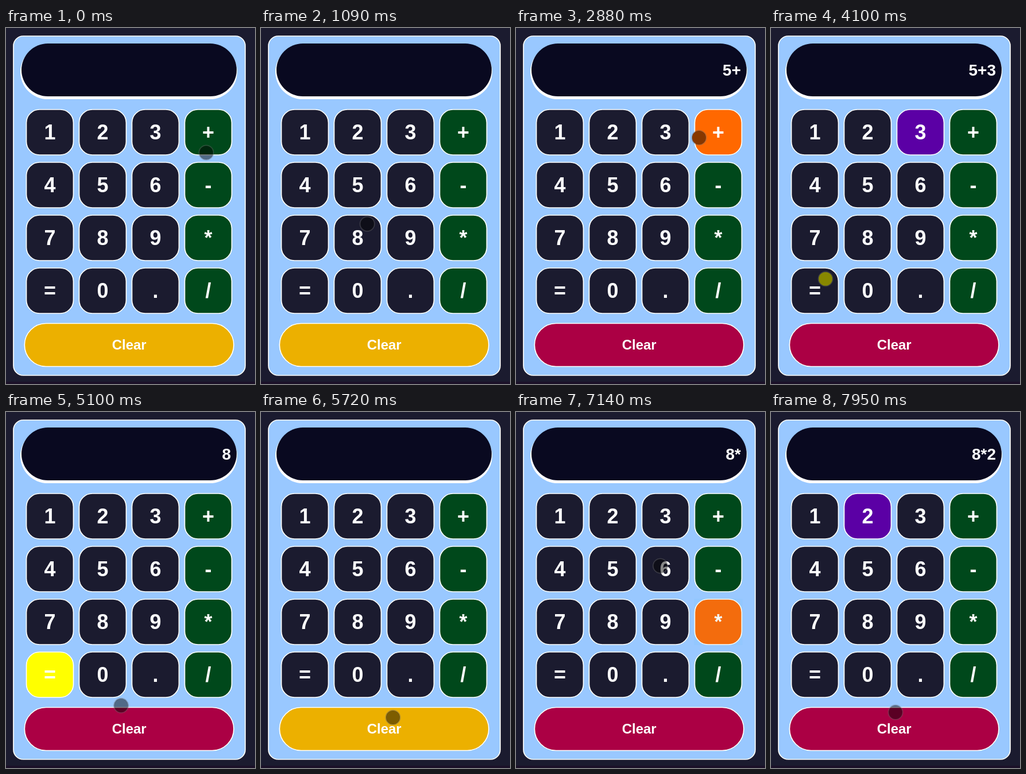
Recreate the animation shown at these times as an HTML page. Size 434 by 620 pixels, loop 8000 ms.

```html
<!DOCTYPE html>
<html lang="en">
<head>
<meta charset="utf-8">
<title>Calculator</title>
<style>
  html, body { margin: 0; width: 100%; height: 100%; overflow: hidden; background: #1b1b2f; }
  svg { display: block; width: 434px; height: 620px; }
  text { font-family: "Liberation Sans", Arial, sans-serif; font-weight: bold; fill: #fff; }
</style>
</head>
<body>
<svg id="stage" viewBox="0 0 434 620"></svg>
<script>
const LOOP = 8000;
const stage = document.getElementById('stage');

function add(tag, attrs, text) {
  const el = document.createElementNS('http://www.w3.org/2000/svg', tag);
  set(el, attrs);
  if (text) el.textContent = text;
  stage.append(el);
  return el;
}
function set(el, attrs) {
  for (const k in attrs) el.setAttribute(k, attrs[k]);
}
const box = (x, y, width, height, rx, fill, more) =>
  add('rect', { x, y, width, height, rx, fill, ...more });
const border = { stroke: '#fff', 'stroke-width': 1.7 };

// Case and display
box(0, 0, 434, 620, 0, '#1b1b2f');
box(0, 616, 434, 4, 0, '#1b1128');
box(13, 14, 404, 591, 17, '#99c8ff', border);
box(25, 29, 378, 95, 47.5, '#fff');
box(27, 27, 375, 92, 46, '#090920');
const display = add('text', { x: 392, y: 83, 'font-size': 28, 'text-anchor': 'end' });

// Keys
const keys = {};
function addKey(label, x, y, w, h, rx, size, base, hover) {
  const face = box(x + 1, y + 1, w - 2, h - 2, rx, base, border);
  add('text', {
    x: x + w / 2, y: Math.floor(y + h / 2 + size * 0.352),
    'font-size': size, 'text-anchor': 'middle'
  }, label);
  keys[label] = { face, base, hover, area: { x, y, width: w, height: h } };
}
[...'123+456-789*=0./'].forEach((label, i) => {
  const col = i % 4, row = Math.floor(i / 4);
  const hover = col === 3 ? '#ff6800' : label === '=' ? '#ffff00' : '#5b00a5';
  addKey(label, 34.5 + 92 * col, 141 + 92 * row, 84, 81, 23, 36,
    col === 3 ? '#00481b' : '#1b1b2f', hover);
});
addKey('Clear', 31.3, 513.5, 366.7, 77, 37.5, 24, '#ab0044', '#ecb000');

const flash = box(0, 0, 0, 0, 0, '#33b5e5');

// Touch pointer: key tint, soft ring, dark dot
const tint = add('circle', { r: 12 });
const ring = add('circle', { r: 12.5, fill: 'none', stroke: '#666', 'stroke-width': 2, 'stroke-opacity': 0.4 });
const dot = add('circle', { r: 12, 'fill-opacity': 0.47 });

const taps = [
  { at: -1000, key: 'Clear' }, { at: 2080, key: '5' }, { at: 2700, key: '+' },
  { at: 3120, key: '3' }, { at: 4130, key: '=' }, { at: 5590, key: 'Clear' },
  { at: 6380, key: '8' }, { at: 7015, key: '*' }, { at: 7560, key: '2' }
];

const sum = text => String(text.split('+').reduce((a, b) => a + Number(b), 0));
const press = (text, key) =>
  key === 'Clear' ? '' : key === '=' ? sum(text) : text + key;

// Pointer moves; bend pushes the curve to one side
const start = { x: 349, y: 217 };
const moves = [
  { at: 10, time: 300, x: 300, y: 171 },
  { at: 310, time: 510, x: 205, y: 426, bend: 60 },
  { at: 880, time: 870, x: 170, y: 276 },
  { at: 2075, time: 354, x: 319, y: 191, bend: 67 },
  { at: 2890, time: 200, x: 268, y: 190 },
  { at: 3360, time: 470, x: 95, y: 437 },
  { at: 4870, time: 580, x: 230, y: 532 },
  { at: 5960, time: 380, x: 172, y: 370 },
  { at: 6480, time: 360, x: 345, y: 366 },
  { at: 7010, time: 530, x: 182, y: 195 },
  { at: 7640, time: 310, x: 217, y: 523 }
];

const clamp = v => Math.max(0, Math.min(1, v));
const easeOut = p => 1 - (1 - p) ** 3;

function pointer(t) {
  const i = moves.findLastIndex(m => m.at <= t);
  if (i < 0) return { ...start, arrived: 0, resting: true };
  const from = moves[i - 1] || start, to = moves[i];
  const { at, time, bend = 0 } = to;
  const u = easeOut(clamp((t - at) / time));
  const dx = to.x - from.x, dy = to.y - from.y;
  const push = 2 * u * (1 - u) * bend / Math.hypot(dx, dy);
  return {
    x: from.x + dx * u - dy * push,
    y: from.y + dy * u + dx * push,
    arrived: at + time,
    resting: t >= at + time
  };
}

function draw(t) {
  const done = taps.filter(tap => tap.at <= t);
  const { at, key } = done[done.length - 1];
  const age = t - at;
  for (const name in keys) {
    const k = keys[name];
    set(k.face, { fill: name === key && age >= 100 ? k.hover : k.base });
  }
  display.textContent = done.reduce((text, tap) => press(text, tap.key), '');
  set(flash, { ...keys[key].area, opacity: 0.4 * clamp((130 - age) / 30) });

  const p = pointer(t);
  for (const c of [tint, ring, dot]) set(c, { cx: p.x, cy: p.y });

  // The dot takes the key's colour from just before a tap until it leaves
  const touch = taps.findLast(tap => tap.at - 70 <= t);
  const touching = p.resting && touch.at >= p.arrived;
  set(tint, { fill: keys[touch.key].hover, opacity: touching ? 1 : 0 });
}

const begin = performance.now();
function tick() {
  draw((performance.now() - begin) % LOOP);
  requestAnimationFrame(tick);
}
tick();
</script>
</body>
</html>
```
